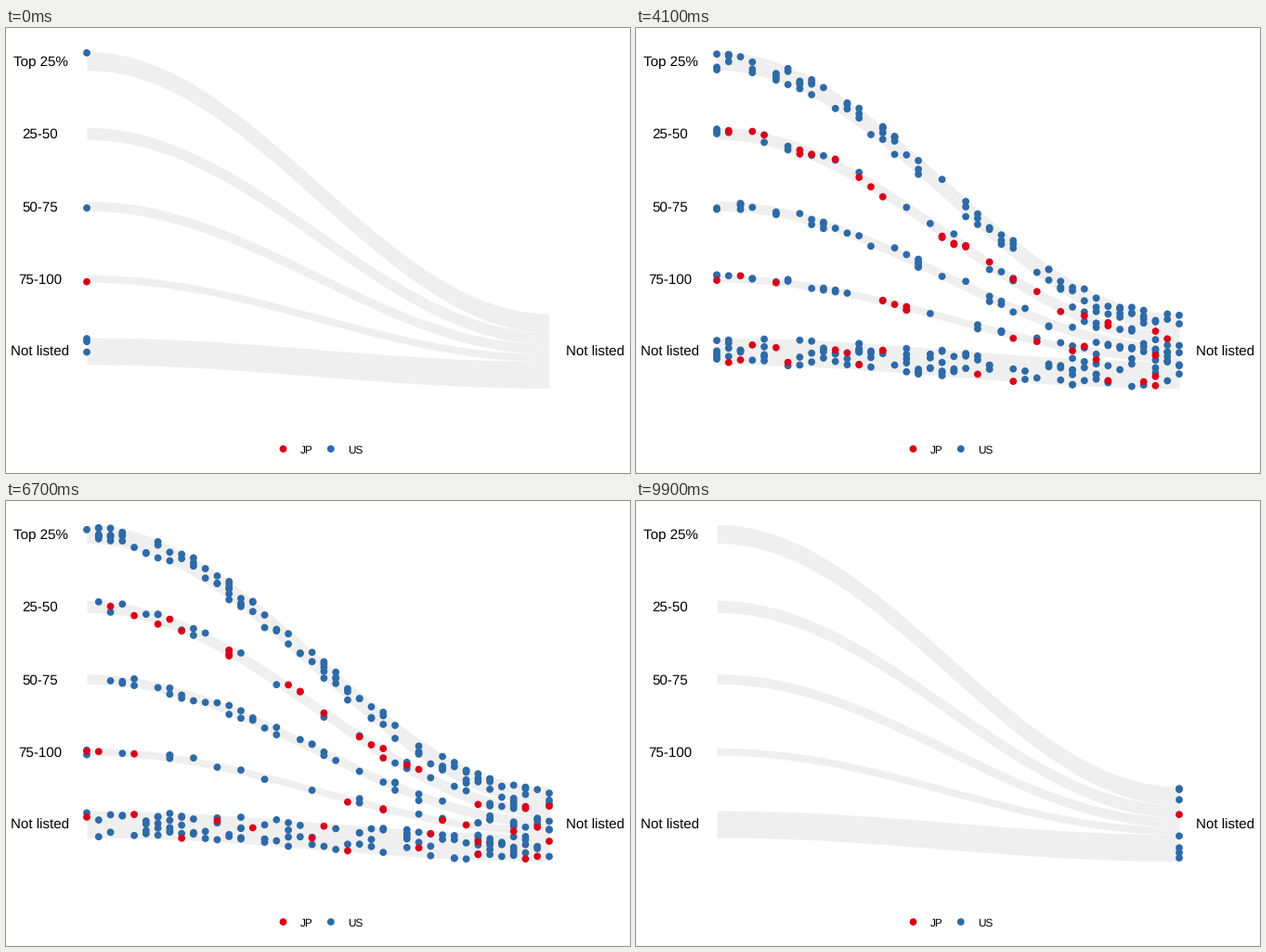
These frames come from a looping animation (672x480 px, 10000 ms). A matplotlib script:

```python
import numpy as np
import matplotlib.pyplot as plt
from matplotlib.animation import FuncAnimation

W, H, DPI = 672, 480, 96
FRAMES, STEPS, LAST = 100, 39, 98
X0, X1 = 87, 585
Y_LEFT, GAP, Y_RIGHT = 35.5, 78.25, 308
RED, BLUE, GREY = "#db0019", "#2d6aa7", "#efefef"

plt.rcParams["font.family"] = "Liberation Sans"
plt.rcParams["text.hinting"] = "none"

# label, band width, US and JP dots setting off per tick
BANDS = [
    ("Top 25%", 20.0, 2.4, 0),
    ("25-50", 13.0, 0.75, 0.65),
    ("50-75", 10.5, 1.1, 0),
    ("75-100", 8.0, 0.5, 0.22),
    ("Not listed", 29.0, 3.0, 0.42),
]
widths = np.array([b[1] for b in BANDS])
centers = Y_LEFT + GAP * np.arange(len(BANDS))
left = centers - widths / 2
right = Y_RIGHT + np.cumsum(widths) - widths


def ease(t):
    return (1 - np.cos(np.pi * t)) / 2


def path(band, t):
    """Top edge of a band at progress t, as x and y."""
    y = left[band] + (right[band] - left[band]) * ease(t)
    return X0 + (X1 - X0) * t, y


def make_dots(rng, column):
    """Start tick, band and offset of every dot of one country."""
    rates = [b[column] for b in BANDS]
    counts = rng.poisson(rates, (LAST + 1, len(BANDS)))
    start, band = np.indices(counts.shape).reshape(2, -1)
    start, band = (np.repeat(a, counts.ravel()) for a in (start, band))
    return start, band, rng.uniform(0, widths[band])


rng = np.random.default_rng(25)
us, jp = make_dots(rng, 2), make_dots(rng, 3)
start, band, offset = (np.concatenate(pair) for pair in zip(us, jp))
colors = np.repeat([BLUE, RED], [len(us[0]), len(jp[0])])

fig = plt.figure(figsize=(W / DPI, H / DPI), dpi=DPI, facecolor="white")
ax = fig.add_axes([0, 0, 1, 1])
ax.set(xlim=(0, W), ylim=(H, 0))
ax.axis("off")


def label(x, y, text):
    ax.text(x, y + 5.6, text, size=11.38, ha="center")


t = np.linspace(0, 1, 200)
for i, (name, width, *_) in enumerate(BANDS):
    x, edge = path(i, t)
    ax.fill_between(x, edge, edge + width, color=GREY, lw=0)
    label(37, centers[i], name)
label(634.5, centers[-1], BANDS[-1][0])

DOT = dict(s=34.2, linewidths=0)
ax.scatter([298.5, 349.8], [454, 454], c=[RED, BLUE], **DOT)
for x, name in ((317.2, "JP"), (368.3, "US")):
    ax.text(x, 458.8, name, size=8.8)
flow = ax.scatter([], [], zorder=3, **DOT)


def draw(frame):
    tick = int(frame * (LAST + STEPS) / (FRAMES - 1) + 0.4)
    step = tick - start
    on = (step >= 0) & (step <= STEPS)
    x, y = path(band[on], step[on] / STEPS)
    flow.set_offsets(np.column_stack([x, y + offset[on]]))
    flow.set_facecolors(colors[on])
    return [flow]


anim = FuncAnimation(fig, draw, frames=FRAMES, interval=100, repeat=True)
plt.show()
```
